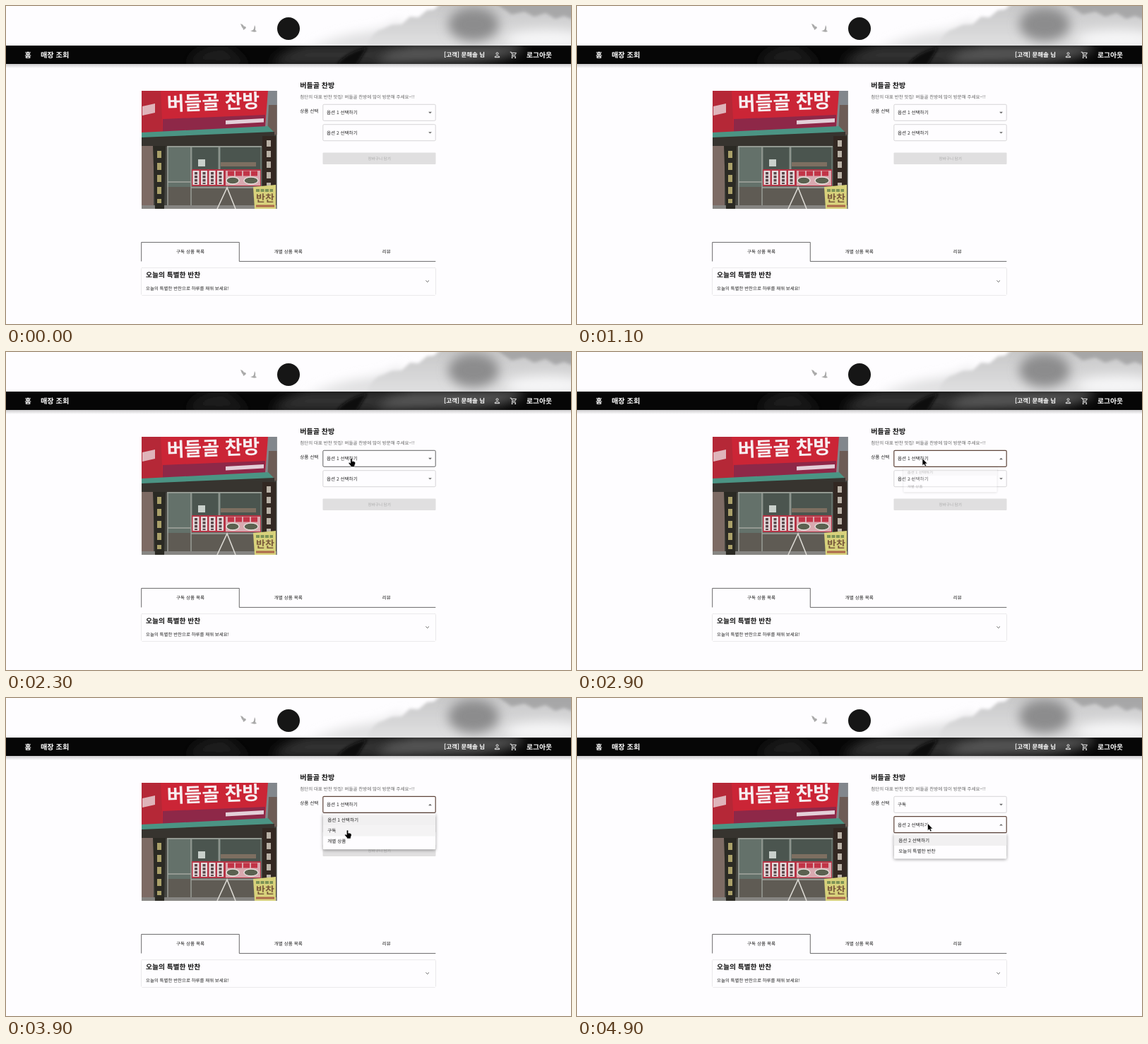
These frames come from a looping animation (800x450 px, 5 s). An HTML page:

```html
<!DOCTYPE html>
<html lang="ko">
<head>
<meta charset="utf-8">
<style>
html, body { margin: 0; width: 100%; height: 100%; overflow: hidden; background: #fefdff; }
svg { display: block; width: 800px; height: 450px; }
text { font: 6.6px "Noto Sans CJK KR", "Noto Sans CJK", sans-serif; fill: #222; text-rendering: geometricPrecision; }
.nav { font-weight: 700; fill: #fff; }
.mid { text-anchor: middle; }
.box { fill: none; stroke-width: .7; }
.paper { filter: drop-shadow(0 1.5px 2px #0006); }
</style>
</head>
<body>
<svg viewBox="0 0 800 450">
  <defs>
    <filter id="soft" x="-30%" y="-60%" width="160%" height="220%"><feGaussianBlur stdDeviation="8"/></filter>
    <filter id="mist" x="-30%" y="-60%" width="160%" height="220%"><feGaussianBlur stdDeviation="2"/></filter>
    <clipPath id="top"><path d="M0 0H800V56H0z"/></clipPath>
    <clipPath id="bar"><path d="M0 56H800V82H0z"/></clipPath>
    <clipPath id="photo"><path d="M192 120H383.500V287H192z"/></clipPath>
    <linearGradient id="shade" x2="0" y2="1"><stop stop-color="#000" stop-opacity=".2"/><stop offset="1" stop-color="#000" stop-opacity="0"/></linearGradient>
    <linearGradient id="hill" x2="0" y2="1"><stop stop-color="#c6c6c7"/><stop offset="1" stop-color="#e2e2e3"/></linearGradient>
  </defs>

  <!-- ink landscape -->
  <g clip-path="url(#top)">
    <path d="M425 62Q470 42 505 38T560 20V62z" fill="#dfdfe0" filter="url(#soft)"/>
    <path d="M510 60Q518 36 533 33L546 27L560 26L572 15L584 16L596 6L606 5L618-6H810V62z" fill="url(#hill)" filter="url(#mist)"/>
    <ellipse cx="662" cy="26" rx="36" ry="24" fill="#8c8c8d" filter="url(#soft)"/>
    <ellipse cx="765" cy="48" rx="58" ry="14" fill="#f6f6f7" filter="url(#soft)"/>
    <path d="M690-6H806V20L790 14L778 18L764 10L748 15L734 8L716 12z" fill="#949495" opacity=".65" filter="url(#mist)"/>
  </g>
  <path d="M332 25q4 1 5 4q2-1 3 2q-2 2-4 3q0-3-2-4zM346 35q4 0 5-3l1-5q2 3 1 7l2 2q-4 2-9-1z" fill="#aaa"/>
  <circle cx="400" cy="32" r="16" fill="#161616"/>

  <!-- navigation bar -->
  <rect y="82" width="800" height="6" fill="url(#shade)"/>
  <rect y="56" width="800" height="26" fill="#060606"/>
  <g clip-path="url(#bar)">
    <g filter="url(#soft)">
      <path d="M255 84Q270 56 310 54L345 84z" fill="#1c1c1c"/>
      <path d="M375 84Q395 60 430 54H560L525 84z" fill="#303030"/>
      <path d="M525 84Q545 58 575 54H735Q725 76 650 80z" fill="#565656"/>
    </g>
    <path d="M468 84Q480 66 512 58L496 84z" fill="#0c0c0c" filter="url(#mist)"/>
  </g>
  <g>
    <text class="nav" x="26.500" y="72.600" style="font-size:10px">홈</text>
    <text class="nav" x="49" y="72.600" style="font-size:10.200px">매장 조회</text>
    <text class="nav" x="620" y="72" style="font-size:8.500px">[고객] 문해솔 님</text>
    <text class="nav" x="737" y="72.600" style="font-size:9.800px">로그아웃</text>
  </g>
  <g fill="none" stroke="#fff" stroke-width=".9">
    <circle cx="695.500" cy="67.300" r="1.500"/>
    <path d="M692.300 72.700V71.500Q695.500 69.200 698.700 71.500V72.700z"/>
    <path d="M713.700 65.200H715.300L717.200 69.200H720.800L722.400 66.300H716M717.200 69.200L716.200 71.200H722"/>
  </g>
  <path d="M715.700 73.200a.9.900 0 1 0 1.800 0a.9.900 0 1 0-1.800 0M720.300 73.200a.9.900 0 1 0 1.800 0a.9.900 0 1 0-1.800 0" fill="#fff"/>

  <!-- shop front -->
  <g clip-path="url(#photo)">
    <path d="M192 120H384V287H192z" fill="#454540"/>
    <path d="M362 120H384V182H360z" fill="#82878c"/>
    <path d="M372 140H384V182H370z" fill="#6d5c55"/>
    <path d="M192 120H222V181L192 184z" fill="#b52837"/>
    <path d="M219 120H371L367 171L222 179z" fill="#cb2536"/>
    <path d="M222 160L367 154V171L222 179z" fill="#8e2848"/>
    <path d="M311 162L365 159V164.500L311 167.500z" fill="#e4cfd8"/>
    <path d="M193 142l18-4v13l-18 4z" fill="#dfb4ba"/>
    <text x="228" y="148" transform="rotate(-2 228 148)" style="font-size:27px;font-weight:700;fill:#f7eef1">버들골 찬방</text>
    <path d="M192 179L371 170L380 179L192 187z" fill="#4b9484"/>
    <path d="M192 186L380 178V199H192z" fill="#37342f"/>
    <path d="M192 198H209V287H192z" fill="#7d6b64"/>
    <path d="M228 198H362V256H228z" fill="#64716a"/>
    <path d="M264 200H300V231H264zM304 200H360V231H304z" fill="#4b554f"/>
    <path d="M272 217h10v10h-10z" fill="#c9d0cb"/>
    <path d="M304 221h50v6h-50z" fill="#7d6f61"/>
    <path d="M228 256H352V282H228z" fill="#5f5b54"/>
    <path d="M229 199V282M262 199V282M302 199V232M228 199H362M229 249H262M262 257H352" fill="none" stroke="#a3a7a0" stroke-width="1.300"/>
    <path d="M192 282H384V287H192z" fill="#868582"/>
    <path d="M208 198H226L224 287H211z" fill="#2b2a24"/>
    <path d="M217 205V279" stroke="#a99f69" stroke-width="6" stroke-dasharray="10 7"/>
    <path d="M363 184H382V259H363z" fill="#332822"/>
    <path d="M372 190V254" stroke="#b9b1a6" stroke-width="6" stroke-dasharray="9 6"/>
    <path d="M263 231H361V255H263z" fill="#b53546"/>
    <path d="M264.500 233h9v20h-9zM276 233h9v20h-9zM287.500 233h9v20h-9zM299 233h9v20h-9z" fill="#e6dcdd"/>
    <path d="M269 235V252M280.500 235V252M292 235V252M303.500 235V252" stroke="#5b474b" stroke-width="4" stroke-dasharray="3.500 1.500"/>
    <path d="M311 233H360V254H311z" fill="#d9a9b0"/>
    <path d="M314 237H356" stroke="#c23447" stroke-width="7" stroke-dasharray="9 2"/>
    <g fill="#5b6150" stroke="#e9e3df" stroke-width="1.300"><ellipse cx="321" cy="247" rx="9" ry="5"/><ellipse cx="347" cy="247" rx="10" ry="5"/></g>
    <path d="M299 287L313 257L325 287" fill="none" stroke="#dad8d2" stroke-width="1.600"/>
    <path d="M350 256L382 253V287H352z" fill="#d8d27c"/>
    <path d="M354 261H378" stroke="#7d9256" stroke-width="4" stroke-dasharray="5 1.500"/>
    <text x="354" y="277" style="font-size:14px;font-weight:700;fill:#7a5a3c">반찬</text>
    <path d="M354 283H380" stroke="#ae6a4c" stroke-width="3"/>
  </g>

  <!-- product form -->
  <text x="416.300" y="115.600" style="font-size:10px;font-weight:700;fill:#111">버들골 찬방</text>
  <text x="416.300" y="131" style="font-size:6.500px;fill:#666">첨단의 대표 반찬 맛집! 버들골 찬방에 많이 방문해 주세요~!!</text>
  <text x="416.300" y="151.300" style="font-weight:500">상품 선택</text>
  <rect class="box" id="box1" x="448.800" y="139.300" width="159.400" height="23" rx="1.500"/>
  <rect class="box" id="box2" x="448.800" y="167.700" width="159.400" height="23" rx="1.500"/>
  <text id="value1" x="454" y="153.400"></text>
  <text x="454" y="181.800">옵션 2 선택하기</text>
  <path id="arrow1" d="M-2.400-1.200H2.400L0 1.200z" fill="#666"/>
  <path id="arrow2" d="M-2.400-1.200H2.400L0 1.200z" fill="#666"/>
  <rect x="448.500" y="207.500" width="160" height="16.500" rx="1" fill="#e0dfe0"/>
  <text class="mid" x="528.700" y="218" style="font-size:5.600px;fill:#aaa">장바구니 담기</text>

  <!-- tabs and accordion -->
  <path d="M191.700 361.400V334.400H330.300V361.400H608.300" fill="none" stroke="#444" stroke-width=".8"/>
  <text class="mid" x="261" y="349.800">구독 상품 목록</text>
  <text class="mid" x="399.800" y="349.800">개별 상품 목록</text>
  <text class="mid" x="538.800" y="349.800">리뷰</text>
  <rect x="191.700" y="370.300" width="416.600" height="39" rx="1.500" fill="#fefdff" style="filter:drop-shadow(0 .8px .6px #0006)"/>
  <text x="198" y="384" style="font-size:9.750px;font-weight:700;fill:#111">오늘의 특별한 반찬</text>
  <text x="198" y="401.600" style="font-size:6.450px">오늘의 특별한 반찬으로 하루를 채워 보세요!</text>
  <path d="M594.400 388.400L596.700 390.700L599 388.400" fill="none" stroke="#555" stroke-width=".9"/>

  <g id="menu1" class="paper">
    <rect x="448.800" y="163.300" width="159.400" height="51" rx="1.500" fill="#fefdff"/>
    <rect x="448.800" y="165.500" width="159.400" height="15" fill="#f1f0f1"/>
    <rect id="hover" x="448.800" y="180.500" width="159.400" height="15" fill="#f4f3f4"/>
    <text x="455.300" y="175.400">옵션 1 선택하기</text>
    <text x="455.300" y="190.400">구독</text>
    <text x="455.300" y="205.400">개별 상품</text>
  </g>
  <g id="menu2" class="paper">
    <rect x="448.800" y="191.700" width="159.400" height="35.800" rx="1.500" fill="#fefdff"/>
    <rect x="448.800" y="194" width="159.400" height="15" fill="#f1f0f1"/>
    <text x="455.300" y="203.800">옵션 2 선택하기</text>
    <text x="455.300" y="218.800">오늘의 특별한 반찬</text>
  </g>

  <g id="cursor" stroke="#fff" stroke-width=".6" stroke-linejoin="round">
    <path id="pointer" d="M0 0V10.200L2.300 8.200L3.900 11.600L5.700 10.800L4.200 7.500H7.200z"/>
    <path id="hand" d="M-1.200 1.200a1.200 1.200 0 0 1 2.400 0V4.200Q3.500 3.800 5 5.100Q5.900 5.700 5.600 7.400L4.600 10.200V12H-.8V10.800L-3.800 7.200Q-3.800 5.400-2.200 6L-1.200 6.800z"/>
  </g>
</svg>
<script>
const $ = id => document.getElementById(id);
const clamp = v => Math.max(0, Math.min(1, v));
const ease = v => v * v * (3 - 2 * v);
const show = (id, on) => $(id).setAttribute('visibility', on ? 'visible' : 'hidden');

// time, x, y: the cursor eases from stop to stop
const stops = [[1400, 237, 424], [1600, 249, 374.5], [2300, 489, 150.5], [3300, 489, 150.5],
  [3700, 483.5, 187], [4100, 483.5, 187], [4400, 496.5, 177.5], [5000, 496.5, 177.5]];

function place(t) {
  const i = Math.max(1, stops.findIndex(s => s[0] >= t));
  const [t0, x0, y0] = stops[i - 1], [t1, x1, y1] = stops[i];
  const k = ease(clamp((t - t0) / (t1 - t0)));
  return [x0 + (x1 - x0) * k, y0 + (y1 - y0) * k];
}

function menu(id, grow, fade, y) {
  show(id, grow > 0 && fade > 0);
  $(id).style.opacity = grow * fade;
  const s = 0.75 + 0.25 * grow;
  $(id).setAttribute('transform', `translate(528.5 ${y}) scale(${s} ${s * s}) translate(-528.5 ${-y})`);
}

function field(n, y, focus, hover, open) {
  const box = $('box' + n);
  box.setAttribute('stroke', focus ? '#5f453b' : hover ? '#222' : '#c6c5c6');
  box.style.strokeWidth = focus ? 1.2 : 0.7;
  $('arrow' + n).setAttribute('transform', `translate(600.5 ${y}) scale(1 ${open ? -1 : 1})`);
}

function draw(t) {
  const [x, y] = place(t);
  const inside = (x0, y0, x1, y1) => t >= 1400 && x >= x0 && x <= x1 && y >= y0 && y <= y1;
  const open1 = t >= 2900 && t < 4000, open2 = t >= 4600;
  const over1 = inside(449, 139, 608, 162), over2 = inside(449, 167, 608, 191);

  field(1, 151, t >= 2900 && t < 4600, over1, open1);
  field(2, 179.4, open2, over2 && t >= 4100, open2);
  $('value1').textContent = t < 4000 ? '옵션 1 선택하기' : '구독';
  menu('menu1', clamp((t - 2820) / 250), clamp((4250 - t) / 300), 163);
  menu('menu2', clamp((t - 4520) / 250), 1, 192);
  $('hover').style.opacity = t >= 3500 ? 1 : 0;

  const hand = open2 ? false : open1 ? inside(449, 164, 608, 214)
    : over1 || over2 || inside(192, 370, 608, 410) || inside(192, 334, 608, 361);
  $('cursor').setAttribute('transform', `translate(${x} ${y})`);
  show('pointer', t >= 1400 && !hand);
  show('hand', t >= 1400 && hand);
}

const start = performance.now();
function tick(now) {
  // the page is redrawn ten times a second
  draw(Math.floor(Math.max(0, now - start) % 5000 / 100) * 100);
  requestAnimationFrame(tick);
}
tick(start);
</script>
</body>
</html>
```
